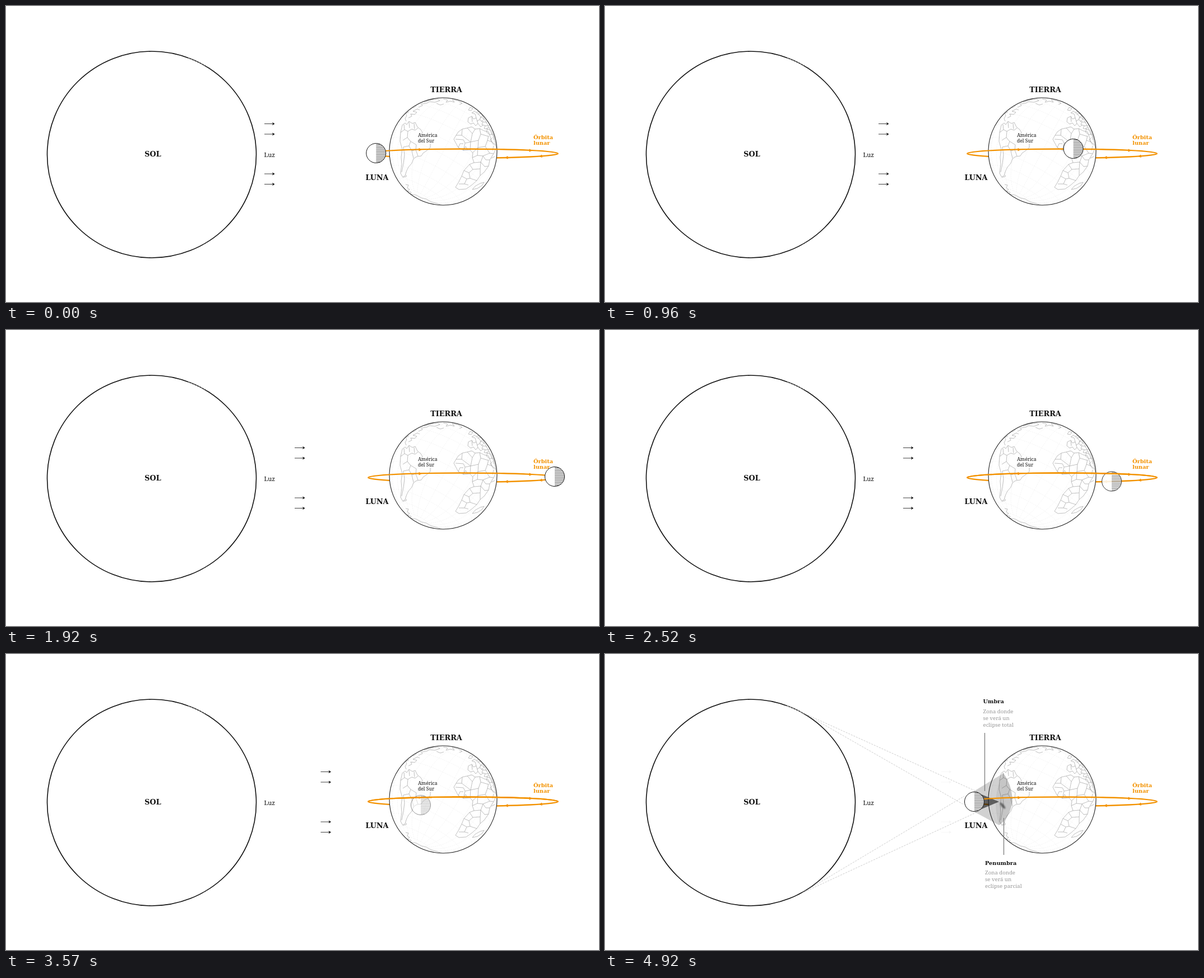
An HTML page that plays this animation: 1058x529 px, repeating every 4.98 s.

```html
<!DOCTYPE html>
<html lang="es">
<head>
<meta charset="utf-8">
<title>Eclipse solar</title>
<style>
  html, body { margin: 0; width: 100%; height: 100%; overflow: hidden; background: #fff; }
  svg { display: block; width: 100%; height: 100%; }
  text { font-family: "Noto Serif", serif; fill: #111; }
  .title, .head { font-family: "DejaVu Serif", "Noto Serif", serif; font-weight: 700; }
  .title { font-size: 12.8px; text-anchor: middle; }
  .head { font-size: 9.8px; }
  .small { font-size: 8.6px; }
  .note { font-size: 9.6px; fill: #999; }
  .orange { fill: #f39200; }
  .line { fill: none; }
  .orbit { fill: none; stroke: #f39200; stroke-width: 2.4; }
  .land { fill: none; stroke: #aaa; stroke-width: .75; stroke-linejoin: round; }
  .pointer { stroke: #7c7c7c; stroke-width: 1.3; }
</style>
</head>
<body>
<svg viewBox="0 0 1058 529">
  <defs>
    <clipPath id="globe"><circle cx="780" cy="260" r="96"/></clipPath>
    <path id="upperArc" class="orbit" d="M646 263.7A169.5 8.2 0 0 1 985 263.7"/>
    <path id="arrowHead" class="orange" d="M-2.5 -2.8L3 0L-2.5 2.8Z"/>
    <filter id="soft" x="-50%" y="-50%" width="200%" height="200%"><feGaussianBlur stdDeviation="1.3"/></filter>
  </defs>

  <ellipse cx="260" cy="265.5" rx="186.5" ry="184.5" class="line" stroke="#111" stroke-width="1.6"/>
  <path d="M325 92.5L365 110.6M352 427L364 420" class="line" stroke="#ccc" stroke-width=".8" stroke-dasharray="3 2"/>
  <text class="title" x="262" y="269.3">SOL</text>
  <text x="460.5" y="269.5" font-size="11">Luz</text>

  <path id="rays" class="line" stroke="#c2c2c2" stroke-width=".85" stroke-dasharray="3 2"
    d="M325 92.5L666 247M350 103L638 268M352 427L641 254M352 427L666 281.5"/>

  <path class="orbit" d="M646 263.7A169.5 8.2 0 0 0 985 263.7"/>
  <use href="#arrowHead" transform="translate(893 271) rotate(178)"/>
  <use href="#arrowHead" transform="translate(954 268.5) rotate(174)"/>

  <circle cx="780" cy="260" r="96" fill="#fff"/>
  <g clip-path="url(#globe)">
    <path id="graticule" class="line" stroke="#ececec" stroke-width=".6" stroke-dasharray="2 1.5"/>
    <!-- South America -->
    <path class="land" d="M707 213L712 209L715 212L719 206L725 210L730 208L734 216L740 221L743 226L740 230M757 246L757 253L750 259L744 263L741 268L733 269L727 273L724 281L718 288L715 294L712 303L708 306L704 299L706 283L705 270L707 256L703 242L704 226L707 213"/>
    <path class="land" d="M710 212L711 221L717 224L716 235L708 240M704 226L711 221M717 224L724 220L730 222L735 218M719 207L720 218M728 210L729 220M716 235L722 242L719 250L709 252M722 242L732 248L731 257L724 259L719 250M724 259L727 272M709 252L711 266L709 282L706 297M731 257L735 268M708 306L714 305L714 302"/>
    <!-- Caribbean and the northern rim -->
    <path class="land" d="M714 206L712 201L715 196L713 192L718 190L716 186L722 184L721 180L728 182L732 178M718 200L724 197L722 193L729 194L733 190L726 188L734 184L738 186M736 181L743 178L741 175L750 174L756 171L765 172L774 169L770 166L758 168L746 172M780 166L788 168L785 172L793 170L800 172L796 167L806 169L814 174L809 176M768 174L775 177L781 175"/>
    <!-- Antarctica -->
    <path class="land" d="M713 319L718 320L716 325L720 328L716 331L723 333L721 336L732 338L741 343L750 345L758 350L770 353L777 356"/>
    <!-- Europe and Asia -->
    <path class="land" d="M824 207L825 200L831 197L834 202L839 200L837 193L831 191L836 188L842 193L847 198L845 203L851 207L849 212L855 214L853 219L859 220L857 225L863 230M824 207L829 211L834 209L838 214L842 210L847 216L851 213M830 187L833 183L828 181L825 186L830 187M839 190L844 189L850 196L856 206L862 217L867 230"/>
    <path class="land" d="M831 198L832 207M839 200L842 210M842 193L848 192M847 198L853 202L848 207M851 207L858 208M855 214L862 214M845 203L840 206M850 196L846 201M859 220L865 222M862 217L857 219M863 230L869 229L871 239M866 222L870 234L874 249M868 235L864 239L870 248"/>
    <!-- Africa -->
    <path class="land" d="M802 244L799 238L803 231L807 225L814 220L823 218L831 216L837 220L845 219L853 223L861 225L864 234L867 243L872 247L875 253L870 264L863 275L861 286L853 297L846 303L840 312L831 320L821 327L808 328L802 324L808 314L813 304L817 294L827 283L835 280L832 271L833 263L828 257L816 258L807 253L802 244"/>
    <path class="land" d="M803 231L813 231L814 220M813 231L829 243L832 228L823 218M832 228L837 220M829 243L819 245L816 239L802 238M819 245L816 258M829 243L828 257M829 243L843 240L847 229L845 219M847 229L861 233M843 240L842 253L832 263M842 253L855 251L859 240L867 243M859 240L861 232M855 251L863 263L870 264M842 253L841 267L832 271M841 267L851 268L863 263"/>
    <path class="land" d="M835 280L847 279L851 268M847 279L854 287L861 286M827 283L833 292L846 291L847 279M817 294L826 298L833 292M826 298L828 308L840 312M846 291L846 303M813 304L822 309L828 308M822 309L818 318L808 318M818 318L825 320M816 258L820 251L824 257M807 253L810 246L816 246M851 268L856 275L863 275"/>
    <path class="land" d="M832 328L837 322L846 317L853 315L849 321L841 326L832 328M870 250L868 258M866 272L872 269"/>
  </g>

  <g id="shadow">
    <path d="M648 251.5L711 213Q727 236 727 264Q722 293 703 306L648 276Z" fill="#000" fill-opacity=".18"/>
    <path d="M711 213Q727 236 727 264Q722 293 703 306Q688 257 711 213Z" fill="#000" fill-opacity=".05"/>
    <path d="M660 246L703 264L660 282Z" fill="#000" fill-opacity=".55"/>
    <ellipse rx="7" ry="2.6" transform="translate(709.5 271) rotate(50)" fill="#444" fill-opacity=".75" filter="url(#soft)"/>
  </g>
  <circle cx="780" cy="260" r="96" class="line" stroke="#222" stroke-width="1.1"/>

  <use href="#upperArc"/>
  <use href="#arrowHead" transform="translate(739 256.6)"/>
  <use href="#arrowHead" transform="translate(936 258.2) rotate(4)"/>

  <text class="title" x="785.5" y="153.7">TIERRA</text>
  <text class="title" x="662" y="311">LUNA</text>
  <text class="small" x="735" y="233.5">América</text>
  <text class="small" x="735" y="244">del Sur</text>
  <text class="head orange" x="941" y="237.5">Órbita</text>
  <text class="head orange" x="941" y="247.5">lunar</text>

  <g id="notes">
    <text class="head" x="674.5" y="88">Umbra</text>
    <text class="note" x="674.5" y="105.5">Zona donde</text>
    <text class="note" x="674.5" y="117.5">se verá un</text>
    <text class="note" x="674.5" y="129.5">eclipse total</text>
    <path class="pointer" d="M677.5 141V245M711.5 293V359"/>
    <text class="head" x="678" y="376.5">Penumbra</text>
    <text class="note" x="678" y="394">Zona donde</text>
    <text class="note" x="678" y="406">se verá un</text>
    <text class="note" x="678" y="418">eclipse parcial</text>
  </g>

  <g id="moon">
    <circle r="17.5" fill="#fff" stroke="#111" stroke-width="1"/>
    <path id="hatch" class="line" stroke="#222" stroke-width=".75"/>
  </g>
  <use id="arcOverMoon" href="#upperArc"/>

  <path id="arrows" fill="#111" stroke="#111" stroke-width=".8"/>
</svg>
<script>
const LOOP = 4980, STEP = 30;
const $ = id => document.getElementById(id);

// time, x, y of the moon's centre
const moonPath = [
  [0, 660.3, 263], [540, 777, 256], [960, 835.6, 255], [1620, 933, 258],
  [1920, 979, 262], [2010, 980.5, 264.5], [2160, 968, 267.5], [2520, 904, 270.5],
  [2700, 876, 271], [3240, 780, 271], [3570, 740, 270], [3780, 714.5, 268.5],
  [4350, 667.5, 265], [4740, 659, 264], [LOOP, 659, 264]
];
const moonOpacity = [[0, 1], [2400, 1], [2850, .45], [3700, .45], [4200, 1], [LOOP, 1]];

const ramp = (t, from, to) => Math.min(1, Math.max(0, (t - from) / (to - from)));
const segment = (keys, t) => Math.max(0, keys.findIndex(k => k[0] > t) - 1);

function linear(keys, t) {
  const i = segment(keys, t), [t0, a] = keys[i], [t1, b] = keys[i + 1];
  return a + (b - a) * ramp(t, t0, t1);
}

// Monotone cubic interpolation of one column
function smooth(keys, t, col) {
  const secant = i => (keys[i + 1][col] - keys[i][col]) / (keys[i + 1][0] - keys[i][0]);
  const slope = i => {
    if (i === 0) return secant(0);
    if (i === keys.length - 1) return secant(i - 1);
    const a = secant(i - 1), b = secant(i);
    return a * b <= 0 ? 0 : 2 * a * b / (a + b);
  };
  const i = segment(keys, t), h = keys[i + 1][0] - keys[i][0], u = (t - keys[i][0]) / h;
  const a = keys[i][col], b = keys[i + 1][col], v = 1 - u;
  return a * v * v * (1 + 2 * u) + b * u * u * (3 - 2 * u)
    + h * u * v * (slope(i) * v - slope(i + 1) * u);
}

// Orthographic globe: tilted towards the south, rolled clockwise
function project(lat, lon) {
  const rad = Math.PI / 180, tilt = -12 * rad, roll = 28 * rad;
  const p = lat * rad, l = lon * rad;
  const x = Math.cos(p) * Math.sin(l), z = Math.cos(p) * Math.cos(l), y = Math.sin(p);
  const up = y * Math.cos(tilt) - z * Math.sin(tilt);
  const depth = y * Math.sin(tilt) + z * Math.cos(tilt);
  return depth > 0 && [
    780 + 96 * (x * Math.cos(roll) + up * Math.sin(roll)),
    260 + 96 * (x * Math.sin(roll) - up * Math.cos(roll))
  ];
}

function curve(pointAt, from, to) {
  let d = "", pen = "M";
  for (let a = from; a <= to; a += 5) {
    const p = pointAt(a);
    if (p) d += pen + p.map(n => n.toFixed(1)).join(" ");
    pen = p ? "L" : "M";
  }
  return d;
}

let grid = "";
for (let lat = -75; lat <= 75; lat += 15) grid += curve(lon => project(lat, lon), -180, 180);
for (let lon = -180; lon < 180; lon += 15) grid += curve(lat => project(lat, lon), -75, 75);
$("graticule").setAttribute("d", grid);

let hatch = "";
for (let y = -15.6; y < 17; y += 2.6) hatch += `M0 ${y}H${Math.sqrt(17.5 ** 2 - y * y)}`;
$("hatch").setAttribute("d", hatch);

$("arrows").setAttribute("d", [210.5, 229, 300, 318.5]
  .map(y => `M461 ${y}h17M475.5 ${y - 2}l3.5 2l-3.5 2l1.5 -2z`).join(""));

function draw(now) {
  const t = Math.floor(now % LOOP / STEP) * STEP;
  $("moon").setAttribute("transform", `translate(${smooth(moonPath, t, 1)} ${smooth(moonPath, t, 2)})`);
  $("moon").setAttribute("opacity", linear(moonOpacity, t));
  $("arcOverMoon").setAttribute("visibility", t > 2040 && t < 4200 ? "visible" : "hidden");
  $("arrows").setAttribute("transform", `translate(${t * .02813})`);
  $("arrows").setAttribute("opacity", 1 - ramp(t, 4200, 4950));
  $("rays").setAttribute("opacity", ramp(t, 3950, 4860));
  for (const id of ["shadow", "notes"]) $(id).setAttribute("opacity", ramp(t, 4380, 4860));
}

const start = performance.now();
function tick() {
  draw(performance.now() - start);
  requestAnimationFrame(tick);
}
tick();
</script>
</body>
</html>
```
